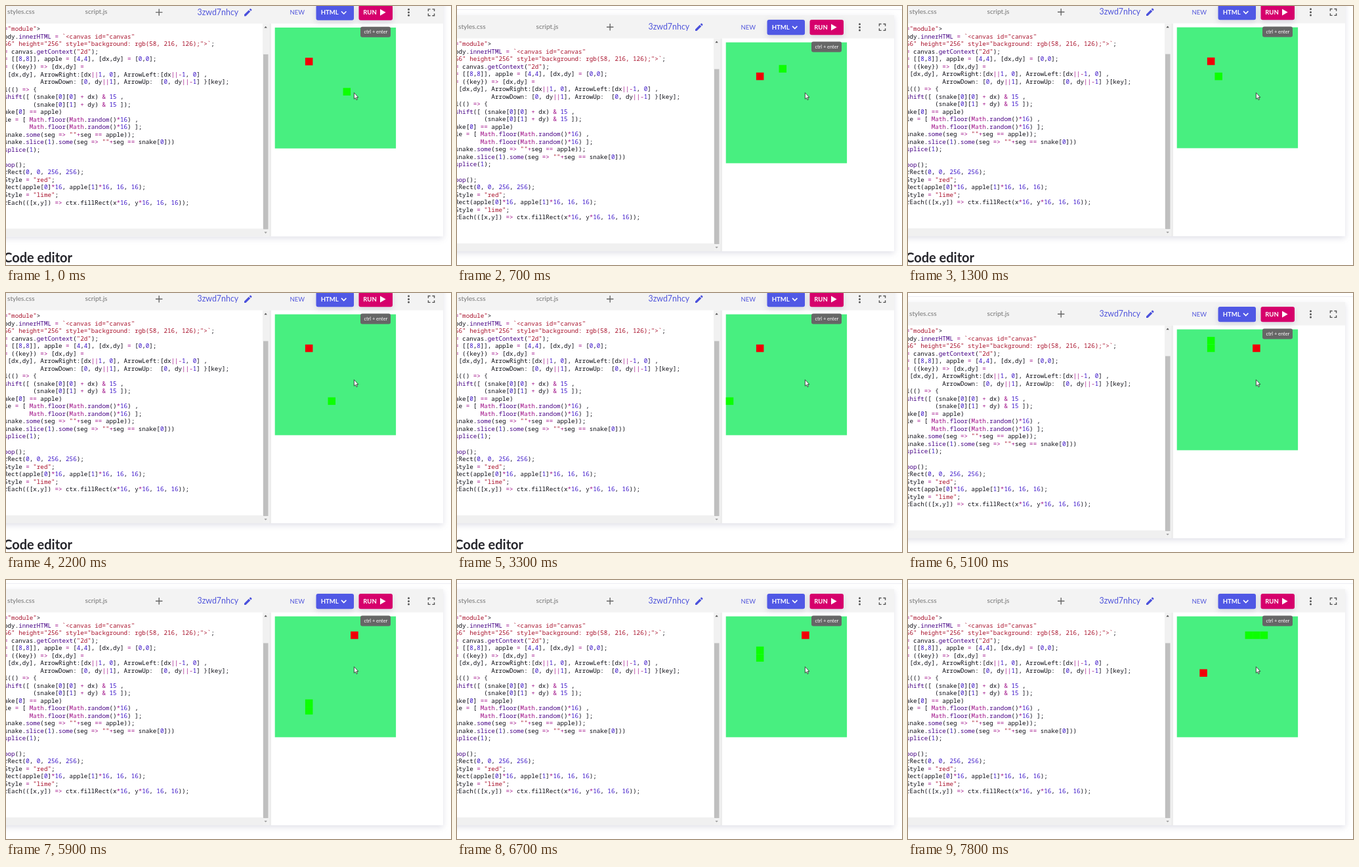
Write an HTML page that moves like this. It is 678 px wide and 396 px high and loops after 8 s.

```html
<!DOCTYPE html>
<html lang="en">
<head>
<meta charset="utf-8">
<title>Snake in a code editor</title>
<style>
html, body { margin: 0; width: 100%; height: 100%; overflow: hidden; background: #fff; }
svg { display: block; }
text { font-family: Lato, "Open Sans", sans-serif; white-space: pre; }
#code text { font: 500 9.233px "Noto Sans Mono", "DejaVu Sans Mono", monospace; fill: #0c0c14; }
#code .str { fill: #a8102a; }
#code .num { fill: #3a14c8; }
#code .op { fill: #a01088; }
#code .fn { fill: #450084; }
.tab { font-size: 10.2px; fill: #757575; }
.btn { font-size: 9.5px; font-weight: 700; fill: #fff; }
.shadow { filter: drop-shadow(0 3px 5px rgba(60, 60, 110, .16)); }
</style>
</head>
<body>
<svg width="678" height="396" viewBox="0 0 678 396">
  <g id="page">
    <rect y="5" width="678" height="1" fill="#ededf3"/>
    <rect class="shadow" x="-20" y="14" width="686" height="361" fill="#fff"/>
    <rect y="14" width="666" height="35.5" fill="#f3f3f3"/>

    <text class="tab" x="2" y="35">styles.css</text>
    <text class="tab" x="120.5" y="35">script.js</text>
    <path d="M228 32.3h10.4M233.2 27.1v10.4" stroke="#666" stroke-width="1.4"/>
    <text x="291.5" y="36.3" font-size="12.4" fill="#5257dc">3zwd7nhcy</text>
    <path d="M363 38.1v-2.4l6.9-6.9 2.4 2.4-6.9 6.9zM370.7 28l1.2-1.2q.6-.4 1.1 0l1.3 1.3q.4.5 0 1.1l-1.2 1.2z" fill="#4a50dc"/>
    <text x="432.5" y="35.8" font-size="9.5" fill="#5257dc">NEW</text>

    <g class="shadow">
      <rect x="472.5" y="21" width="57.5" height="23.3" rx="3" fill="#5058e5"/>
      <rect x="537.5" y="21" width="51.5" height="23.3" rx="3" fill="#d6006c"/>
    </g>
    <text class="btn" x="479.8" y="35.8">HTML</text>
    <path d="M511 30.9l3.7 3.7 3.7-3.7" fill="none" stroke="#fff" stroke-width="1.5"/>
    <text class="btn" x="544.3" y="35.8">RUN</text>
    <path d="M570 27.5v10l8.6-5z" fill="#fff"/>
    <g fill="#555">
      <circle cx="613.5" cy="27.8" r="1.5"/>
      <circle cx="613.5" cy="32.4" r="1.5"/>
      <circle cx="613.5" cy="37" r="1.5"/>
    </g>
    <path d="M643.4 30.7v-3.2h3.2M649.4 27.5h3.2v3.2M652.6 34.2v3.2h-3.2M646.6 37.4h-3.2v-3.2" fill="none" stroke="#555" stroke-width="1.4"/>

    <g id="code"></g>

    <rect y="363" width="391" height="12" fill="#f0f0f0"/>
    <rect x="391" y="49.5" width="9.5" height="325.5" fill="#f1f1f1"/>
    <rect x="392" y="96.5" width="7.5" height="267.5" fill="#bfbfbf"/>
    <path d="M393.4 56.2h4.4l-2.2-2.6z" fill="#555"/>
    <path d="M393.4 368h4.4l-2.2 2.6z" fill="#a0a0a0"/>
    <rect x="400.5" y="49.5" width="3.5" height="325.5" fill="#ededed"/>

    <rect x="409.7" y="55.6" width="184.4" height="184.8" fill="#48ef80"/>
    <g id="game"></g>

    <rect x="540" y="54.5" width="46" height="16" rx="3" fill="#666"/>
    <text x="545.4" y="65" font-size="7.4" fill="#fff">ctrl + enter</text>

    <text x="101" y="415" text-anchor="end" font-size="20" font-weight="700" fill="#24242a">Code editor</text>
  </g>
  <path d="M530.3 132.6v9.6l2.2-2 1.5 3.4 1.5-.7-1.5-3.2h2.9z" fill="#fff" stroke="#222" stroke-width=".8"/>
</svg>
<script>
const NS = 'http://www.w3.org/2000/svg';
const LOOP = 8000, FRAME = 100, GRID = 16;
const CELL = 11.54, LEFT = 409.7, TOP = 55.6;
const page = document.getElementById('page');
const game = document.getElementById('game');
const listing = document.getElementById('code');

function add(parent, tag, attrs, text) {
  const el = document.createElementNS(NS, tag);
  for (const k in attrs) el.setAttribute(k, attrs[k]);
  if (text !== undefined) el.textContent = text;
  parent.appendChild(el);
  return el;
}

// Visible part of the listing; the left edge cuts through the first column.
const code = String.raw`="module">
ody.innerHTML = ~<canvas id="canvas"
56" height="256" style="background: rgb(58, 216, 126);">~;
= canvas.getContext("2d");
= [[8,8]], apple = [4,4], [dx,dy] = [0,0];
= ({key}) => [dx,dy] =
 [dx,dy], ArrowRight:[dx||1, 0], ArrowLeft:[dx||-1, 0] ,
          ArrowDown: [0, dy||1], ArrowUp:  [0, dy||-1] }[key];
l(() => {
shift([ (snake[0][0] + dx) & 15 ,
        (snake[0][1] + dy) & 15 ]);
ake[0] == apple)
le = [ Math.floor(Math.random()*16) ,
       Math.floor(Math.random()*16) ];
snake.some(seg => ""+seg == apple));
snake.slice(1).some(seg => ""+seg == snake[0]))
splice(1);

pop();
rRect(0, 0, 256, 256);
Style = "red";
Rect(apple[0]*16, apple[1]*16, 16, 16);
Style = "lime";
rEach(([x,y]) => ctx.fillRect(x*16, y*16, 16, 16));`.replace(/~/g, '`').split('\n');

const token = new RegExp([
  '(?<str>`[^;]*|^56".*`|"[^"]*")',
  '(?<num>\\b\\d+\\b)',
  '(?<op>=>|[=+*&|-]+|\\bMath\\b)',
  '(?<fn>\\b(?:innerHTML|getContext|floor|random|some|slice|splice|shift|pop)\\b)',
  '\\w+|[^\\w`"=+*&|-]+'
].join('|'), 'g');
code.forEach((line, i) => {
  const row = add(listing, 'text', { x: -2.94, y: 61 + i * 11.53 });
  for (const m of line.matchAll(token)) {
    const kind = Object.keys(m.groups).find(k => m.groups[k]);
    add(row, 'tspan', { class: kind || '' }, m[0]);
  }
});

// Route of the snake; in the idle frames no game tick lands.
const route = [['U', 5], ['L', 4], ['D', 8], ['R', 15], ['U', 25], ['R', 7]]
  .map(([dir, n]) => dir.repeat(n)).join('');
const idle = [9, 14, 19, 24, 29, 34, 39, 40, 49, 54, 58, 63, 68, 73, 79];
const dirs = { U: [0, -1], D: [0, 1], L: [-1, 0], R: [1, 0] };
const apples = [[4, 4], [10, 2], [3, 7]];
const wrap = v => (v + GRID) % GRID;

function play() {
  const states = [];
  let snake = [[9, 8]], eaten = 0, step = 0;
  for (let k = 0; k < LOOP / FRAME; k++) {
    if (k > 0 && !idle.includes(k)) {
      const [dx, dy] = dirs[route[step++]];
      const head = [wrap(snake[0][0] + dx), wrap(snake[0][1] + dy)];
      snake = [head, ...snake];
      if (String(head) === String(apples[eaten])) eaten++;
      else snake.pop();
    }
    states.push({ snake, apple: apples[eaten] });
  }
  return states;
}
const states = play();

// Up and down keys also scroll the page: [start, from, to].
const scrolls = [[-15, -23, 0], [1020, 0, -23], [4000, -23, 0]];
function scrollAt(t) {
  const [start, from, to] = scrolls.filter(s => s[0] <= t).pop();
  const p = Math.min(1, (t - start) / 200);
  return from + (to - from) * p * p * (3 - 2 * p);
}

function cell([x, y], fill) {
  add(game, 'rect', { x: LEFT + x * CELL, y: TOP + y * CELL, width: CELL, height: CELL, fill });
}

const begin = performance.now();
let shown = -1;
function draw() {
  const k = Math.floor(((performance.now() - begin) % LOOP) / FRAME);
  if (k !== shown) {
    shown = k;
    page.setAttribute('transform', `translate(0 ${scrollAt(k * FRAME)})`);
    game.textContent = '';
    cell(states[k].apple, '#f00008');
    states[k].snake.forEach(part => cell(part, '#0cff00'));
  }
  requestAnimationFrame(draw);
}
draw();
</script>
</body>
</html>
```
